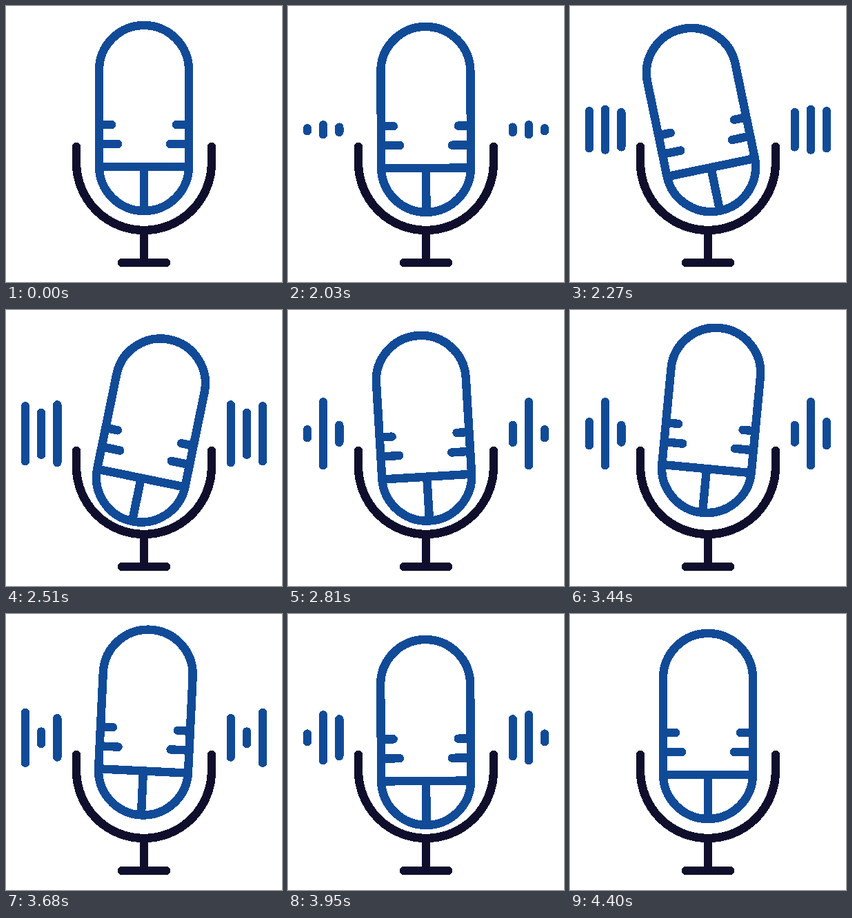
Write an HTML page that moves like this. It is 400 by 400 pixels and loops after 4.43 s.

```html
<!DOCTYPE html>
<html lang="en">
<head>
<meta charset="utf-8">
<title>Microphone</title>
<style>
  html, body { margin: 0; width: 100%; height: 100%; overflow: hidden; background: #fff; }
  svg { display: block; width: 100vw; height: 100vh; shape-rendering: crispEdges; }
  path { fill: none; stroke-width: 12.4; stroke-linecap: round; stroke-linejoin: round; }
  .blue { stroke: #114b97; }
  .dark { stroke: #0f0f2d; }
</style>
</head>
<body>
<svg viewBox="0 0 400 400">
  <path class="dark" d="M102 204V227A98 98 0 0 0 298 227V204M200 325V372M168 372H232"/>
  <path class="blue" id="bars"/>
  <path class="blue" id="mic" d="M135 93A65 65 0 0 1 265 93V232A65 65 0 0 1 135 232Z
    M135 233H265M200 233V297M135 172H153M135 200H162M265 172H247M265 200H238"/>
</svg>
<script>
const LOOP = 4430, START = 2000, STEP = 30, END = 80;
const PIVOT = 212, MID = 179.3, RANGE = 48;

// Turning points of the microphone as [step, value].
const lift = [[0, 0], [3.5, 10], [10, 1], [17, 11], [22, -5], [27, 8.7],
  [36, -6], [41, 6], [53, -8], [65, 9], [76, 0], [END, 0]];
const tilt = [[0, 0], [10, -12], [17, 11.6], [30, -5.6], [48, 5.4], [65, -0.4], [END, 0]];

// Bar half lengths on shared beats, outermost bar first.
const beats = [1, 17, 27, 48, 65, END];
const bars = [
  { x: 28, size: [2, 40, 6, 17, 5.7, 0] },
  { x: 51, size: [7, 30.5, 46, 46, 33, 0] },
  { x: 74.3, size: [3.7, 42, 12.5, 12.3, 27, 0] }
];

const ease = u => (1 - Math.cos(Math.PI * u)) / 2;
const mix = (a, b, u) => a + (b - a) * u;

function follow(keys, f) {
  let i = 1;
  while (i < keys.length - 1 && f > keys[i][0]) i++;
  const [f0, a] = keys[i - 1], [f1, b] = keys[i];
  return mix(a, b, ease((f - f0) / (f1 - f0)));
}

// Halfway between two beats a bar swings to the other end of its range.
function barSize(size, f) {
  let i = 1;
  while (i < beats.length - 1 && f > beats[i]) i++;
  const a = size[i - 1], b = size[i], half = RANGE - (a + b) / 2;
  const u = 2 * (f - beats[i - 1]) / (beats[i] - beats[i - 1]);
  return u < 1 ? mix(a, half, ease(u)) : mix(half, b, ease(u - 1));
}

const mic = document.getElementById('mic');
const wave = document.getElementById('bars');

function draw(t) {
  const f = Math.min(END, Math.max(0, Math.floor((t - START) / STEP)));
  mic.setAttribute('transform',
    `translate(0 ${follow(lift, f)}) rotate(${follow(tilt, f)} 200 ${PIVOT})`);
  let d = '';
  if (f > 0 && f < END) {
    for (const { x, size } of bars) {
      const h = barSize(size, f);
      for (const px of [x, 400 - x]) d += `M${px} ${MID - h}V${MID + h}`;
    }
  }
  wave.setAttribute('d', d);
}

const origin = performance.now();
function tick() {
  draw((performance.now() - origin) % LOOP);
  requestAnimationFrame(tick);
}
draw(0);
requestAnimationFrame(tick);
</script>
</body>
</html>
```
